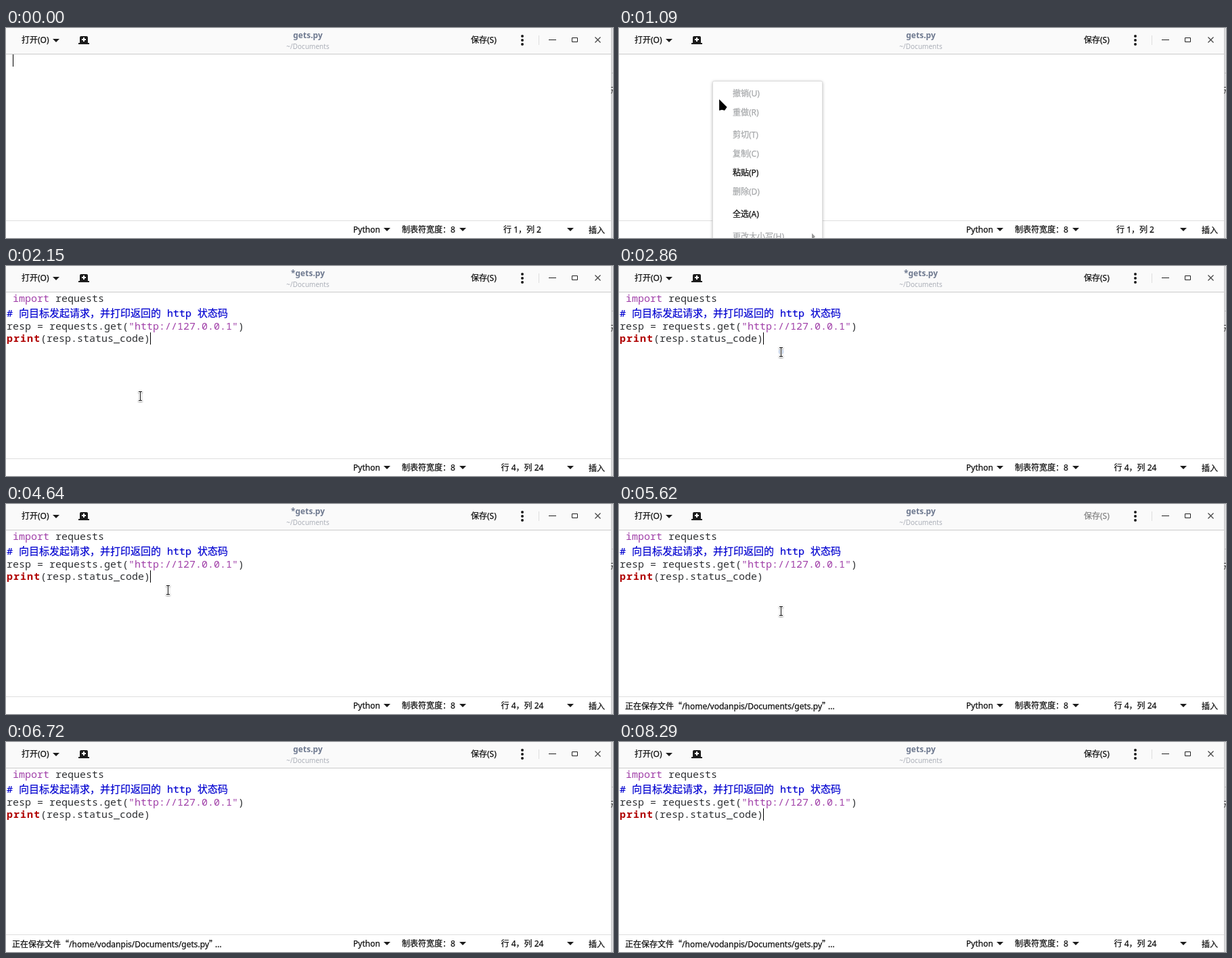
An HTML page for the animation above (8340 ms loop, 897 by 310 pixels).

```html
<!DOCTYPE html>
<html lang="zh-CN">
<head>
<meta charset="utf-8">
<style>
html, body { margin: 0; width: 100%; height: 100%; overflow: hidden; background: #fff; }
svg { display: block; font: 12px "Noto Sans", "Noto Sans CJK SC", sans-serif; fill: #1c1c1c; color: #111; cursor: default; }
text { white-space: pre; fill: currentColor; stroke: currentColor; stroke-width: .25px; }
.mid { text-anchor: middle; }
.cjk { font-family: "Noto Sans CJK SC", sans-serif; }
#title { font-weight: bold; color: #6f7a90; stroke: none; }
#folder { font-size: 10px; color: #abafb8; stroke: none; }
#code { font: 15px "Noto Sans Mono", "Noto Sans CJK SC", monospace; color: #2e3033; }
#code text { stroke-width: 0; }
#code .str { fill: #a03fa8; }
#code .note { color: #0000d0; stroke-width: .2px; }
#code .key { fill: #b00000; font-weight: bold; letter-spacing: 1px; }
#panel { fill: #fff; stroke: #dcdcdc; filter: drop-shadow(0 1px 2px #0004); }
#menu .off { color: #a6a8aa; }
#beam { fill: none; filter: drop-shadow(0 1px 1px #0006); }
</style>
</head>
<body>
<svg width="897" height="310" viewBox="0 0 897 310">
  <defs>
    <path id="drop" d="M-5 0h10l-5 5z"/>
    <linearGradient id="edge">
      <stop stop-color="#c4c4c6"/><stop offset="1" stop-color="#e6e6e8"/>
    </linearGradient>
  </defs>

  <rect width="894" height="310" fill="#fff"/>
  <rect width="894" height="38" fill="#fafafa"/>
  <path d="M0 38.5H894" stroke="#cbcbcb"/>
  <path d="M0 284.5H894" stroke="#dedede"/>
  <rect x="894" width="3" height="310" fill="url(#edge)"/>
  <path d="M895 66.5h2" stroke="#bbb"/>
  <path d="M894 87.5h3M894 91.5h3M896.5 92l-2 5" stroke="#444" fill="none"/>

  <text x="23" y="22">打开(O)</text>
  <use href="#drop" x="74" y="16"/>
  <path d="M109 22v-8q0-2 2-2h8q2 0 2 2v8h2v2h-16v-2z"/>
  <path d="M115 14v6M112 17h6" stroke="#fff" stroke-width="2"/>
  <text id="title" class="mid" x="446" y="15"></text>
  <text id="folder" class="mid" x="446" y="31">~/Documents</text>
  <text id="save" x="687" y="22">保存(S)</text>
  <circle cx="763" cy="12" r="2"/><circle cx="763" cy="18" r="2"/><circle cx="763" cy="24" r="2"/>
  <path d="M787.5 11v14" stroke="#dedede"/>
  <path d="M802 17.5h11M836.5 14.5h8v6h-8z" fill="none" stroke="#222"/>
  <path d="M870.5 13.5l8 8m0-8l-8 8" stroke="#444" stroke-width="1.2"/>

  <text x="513" y="302">Python</text>
  <use href="#drop" x="563" y="295"/>
  <text x="585" y="302">制表符宽度：8</text>
  <use href="#drop" x="675" y="295"/>
  <text id="place" class="mid" x="763" y="302"></text>
  <use href="#drop" x="834" y="295"/>
  <text x="861" y="303">插入</text>
  <g id="message">
    <text x="9" y="303">正在保存文件<tspan class="cjk">“</tspan>/home/vodanpis/Documents/gets.py<tspan class="cjk">”</tspan></text>
    <text x="309" y="303">...</text>
  </g>

  <g id="code">
    <text x="10" y="53"><tspan class="str">import</tspan> requests</text>
    <text x="1" y="75" class="note"># 向目标发起请求，并打印返回的 http 状态码</text>
    <text x="1" y="94">resp = requests.get(<tspan class="str">"http://127.0.0.1"</tspan>)</text>
    <text x="1" y="112"><tspan class="key">print</tspan>(resp.status_code)</text>
  </g>
  <rect id="caret" width="1" height="18" fill="#000"/>

  <g id="menu">
    <rect id="panel" x="138.5" y="78.5" width="162" height="260" rx="2"/>
    <rect id="hover" x="139" y="200" width="161" height="28" fill="#1e9bea"/>
    <path d="M285 303l5 5-5 5z" fill="#999"/>
  </g>

  <circle id="ripple" cx="239.5" cy="126.5" fill="#8fb4e8" stroke="#6f9be0"/>
  <path id="arrow" d="M0 0V16.5L4 15.5 8 16.5 11.5 11.5Z" fill="#000" stroke="#fff" stroke-width="1.2" paint-order="stroke"/>
  <g id="beam">
    <path d="M-3-6.5H3M-3 6.5H3M0-7V7" stroke="#fff" stroke-width="3"/>
    <path d="M-2.5-6.5H2.5M-2.5 6.5H2.5M0-7V7" stroke="#111"/>
  </g>
</svg>

<script>
const LOOP = 8340, MENU_OPEN = 900, PASTE = 1940, SAVE = 5580;
const $ = id => document.getElementById(id);
const show = (id, on) => $(id).setAttribute('visibility', on ? 'visible' : 'hidden');
const within = (t, a, b) => t >= a && t < b;
const put = (id, x, y) => $(id).setAttribute('transform', `translate(${x} ${y})`);

const items = [['撤销(U)', 97], ['重做(R)', 125], ['剪切(T)', 158], ['复制(C)', 186],
  ['粘贴(P)', 214, 1], ['删除(D)', 242], ['全选(A)', 275, 1], ['更改大小写(H)', 308]];
const labels = items.map(([label, y, enabled]) => {
  const text = document.createElementNS('http://www.w3.org/2000/svg', 'text');
  text.textContent = label;
  text.setAttribute('x', 168);
  text.setAttribute('y', y + 4);
  if (!enabled) text.setAttribute('class', 'off');
  return $('menu').appendChild(text);
});

// Pointer way-points: time, x, y
const route = [[390, 250, 312], [860, 139, 79], [980, 139, 79], [1090, 148, 105], [1210, 157, 135],
  [1570, 185, 213], [1980, 185, 213], [2690, 239.5, 126.5], [4640, 239.5, 126.5], [5040, 239.5, 157.5],
  [5620, 239.5, 157.5], [6110, 294.5, 176.5], [6720, 571, 314]];
const hiddenCaret = [[MENU_OPEN, PASTE], [3380, 3770], [5270, 5670], [6690, 7090], [7900, 8290]];

function pointerAt(t) {
  const i = route.findIndex(p => p[0] > t);
  if (i < 1) return null;
  const [t0, x0, y0] = route[i - 1], [t1, x1, y1] = route[i];
  const k = (t - t0) / (t1 - t0);
  return [x0 + (x1 - x0) * k, y0 + (y1 - y0) * k];
}

function draw(t) {
  const pasted = t >= PASTE, menu = within(t, MENU_OPEN, PASTE);
  const pointer = pointerAt(t);
  const [x, y] = pointer || [0, 0];
  const hover = menu && y >= 200;

  $('title').textContent = within(t, PASTE, SAVE) ? '*gets.py' : 'gets.py';
  $('place').textContent = pasted ? '行 4，列 24' : '行 1，列 2';
  $('save').setAttribute('opacity', within(t, SAVE, SAVE + 80) ? 0.5 : 1);
  show('code', pasted);
  show('message', t >= SAVE);

  $('caret').setAttribute('x', pasted ? 213 : 10);
  $('caret').setAttribute('y', pasted ? 98 : 39);
  show('caret', !hiddenCaret.some(([a, b]) => within(t, a, b)));

  show('menu', menu);
  show('hover', hover);
  labels[4].style.color = hover ? '#fff' : '';

  const wave = (t - 2860) / 290;
  show('ripple', within(wave, 0, 1));
  $('ripple').setAttribute('r', Math.max(0, 3.5 + 9 * wave));
  $('ripple').setAttribute('opacity', 0.35 * (1 - wave));

  const arrow = menu || y > 284;
  show('arrow', pointer && arrow);
  show('beam', pointer && !arrow);
  put('arrow', x, y);
  put('beam', Math.floor(x) + 0.5, Math.round(y));
}

function tick() {
  draw(performance.now() % LOOP);
  requestAnimationFrame(tick);
}
tick();
</script>
</body>
</html>
```
